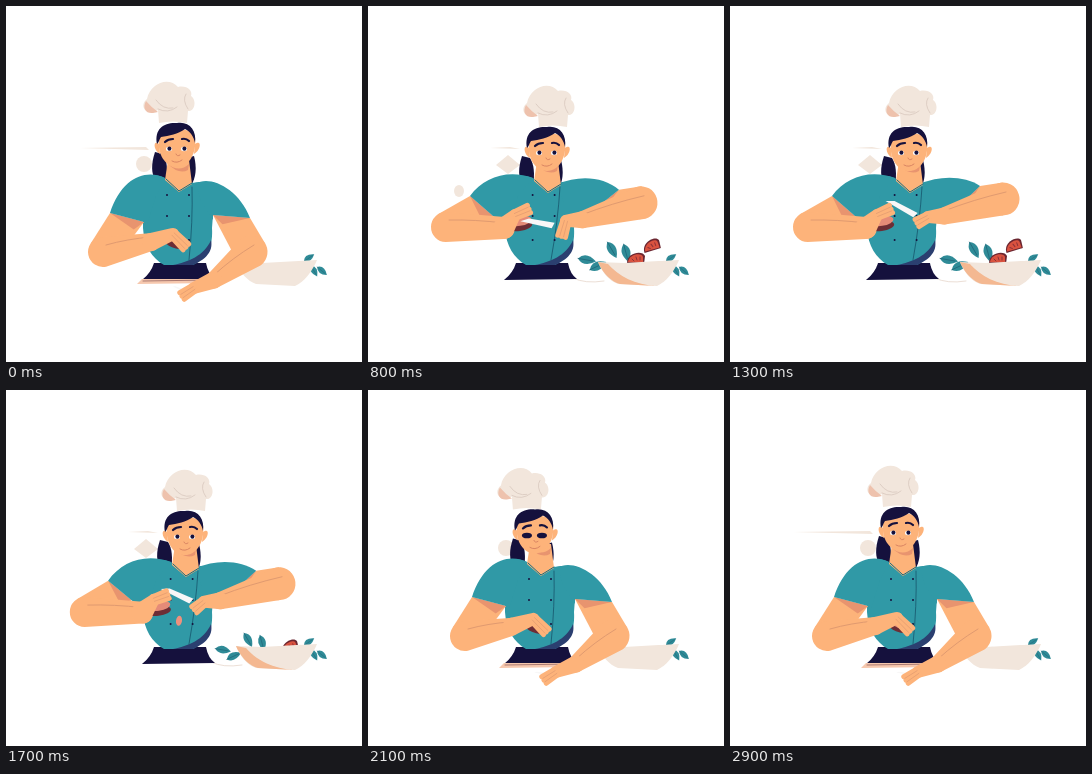
An HTML page that plays this animation: 356 by 356 pixels, repeating every 3000 ms.

```html
<!DOCTYPE html>
<html lang="en">
<head>
<meta charset="utf-8">
<title>Cooking</title>
<style>
html,body{margin:0;width:100%;height:100%;overflow:hidden;background:#fff}
svg{display:block;width:100vw;height:100vh}
</style>
</head>
<body>
<svg id="stage" viewBox="0 0 356 356" fill="none" stroke-linecap="round" stroke-linejoin="round"></svg>
<script>
const LOOP = 3000, STEP = 100;
const TEAL = '#3099a6', SKIN = '#fdb37a', SHADE = '#e8946f', NAVY = '#15113d',
      CREAM = '#f2e6dc', RED = '#d9523f', LEAF = '#2f8b97', CREASE = '#e09a70';
const stage = document.getElementById('stage');

function add(tag, attrs, parent = stage) {
  const e = document.createElementNS('http://www.w3.org/2000/svg', tag);
  for (const k in attrs) e.setAttribute(k, attrs[k]);
  parent.appendChild(e);
  return e;
}
const group = parent => add('g', {}, parent);
const path = (d, fill, parent) => add('path', {d, fill}, parent);
const line = (d, stroke, width, parent) => add('path', {d, stroke, 'stroke-width': width}, parent);
const oval = (cx, cy, rx, ry, fill, parent) => add('ellipse', {cx, cy, rx, ry, fill}, parent);
const shape = (e, d) => e.setAttribute('d', d);
const move = (e, x, y, a = 0, s = 1) => e.setAttribute('transform', `translate(${x} ${y}) rotate(${a}) scale(${s})`);
const show = (e, on) => e.setAttribute('visibility', on ? 'visible' : 'hidden');

const lerp = (a, b, k) => a + (b - a) * k;
const mix = (a, b, k) => [lerp(a[0], b[0], k), lerp(a[1], b[1], k)];
const plus = (a, x, y) => [a[0] + x, a[1] + y];
const clamp = v => Math.min(1, Math.max(0, v));
const ease = (t, from, to) => { const u = clamp((t - from) / (to - from)); return u * u * (3 - 2 * u); };
// goes 0 to 1 between a and b, back to 0 between c and d
const swell = (t, a, b, c, d) => ease(t, a, b) - ease(t, c, d);

function normal(a, b, r) {
  const dx = b[0] - a[0], dy = b[1] - a[1], len = Math.hypot(dx, dy) || 1;
  return [-dy / len * r, dx / len * r];
}
// tapered limb with round ends
function capsule(a, ra, b, rb) {
  const [ax, ay] = normal(a, b, ra), [bx, by] = normal(a, b, rb);
  return `M${plus(a, ax, ay)} L${plus(b, bx, by)} A${rb} ${rb} 0 0 0 ${plus(b, -bx, -by)}` +
    ` L${plus(a, -ax, -ay)} A${ra} ${ra} 0 0 0 ${plus(a, ax, ay)}Z`;
}

// marks behind the cook
const dash = path('', CREAM);
const dot = oval(138, 158, 8, 8, CREAM);
const diamond = path('M140,149 L152,159 L140,168 L128,159Z', CREAM);
const pebble = oval(91, 185, 5, 6, CREAM);

// bowl and what is in it
function leaf(x, y, angle) {
  const g = group();
  path('M-8,0 Q-2,-8 8,0 Q-2,7 -8,0Z', LEAF, g);
  line('M-8,0 L5,0', '#1c5b70', .5, g);
  return {x, y, angle, g};
}
const loose = [leaf(217, 260, 10), leaf(228, 266, -25), leaf(242, 250, 60), leaf(256, 253, 75)];
for (const [x, y, a] of [[303, 252, -35], [308, 265, 60], [316, 265, 40]]) {
  const f = leaf(x, y, a);
  move(f.g, x, y, a, .8);
}
function tomato() {
  const g = group();
  path('M-9,3 C-9,-8 7,-10 9,-4 L8,4Z', '#6b2630', g);
  path('M-8,2 C-7,-6 6,-8 7,-3 L7,3Z', RED, g);
  line('M-4,-1 L-2,1 M0,-3 L1,0 M4,-3 L4,0', '#8c3238', 1, g);
  return g;
}
const half = tomato(), wedge = tomato();
path('M230,256 L256,257 L311,254 C306,266 298,276 289,280 L250,278 C241,275 234,266 230,256Z', CREAM);
const bowlShade = path('M230,256 C235,268 244,276 252,278 L288,280 C268,279 250,270 240,258Z', '#f4b891');
const cloth = line('M205,272 Q217,278 236,275', '#ecdfd6', 1);

const tails = group();
path('M-22,6 C-26,18 -26,28 -21,35 L-11,36 C-9,24 -10,14 -14,8Z', NAVY, tails);
path('M9,12 L17,10 C20,22 19,31 14,40 L9,36Z', NAVY, tails);

const hat = group();
path('M-14,1 L-15,-12 C-28,-5 -34,-17 -26,-23 C-23,-39 -4,-46 5,-35 C14,-37 20,-31 18,-26 C24,-22 22,-10 15,-11 L14,1 Q0,-2 -14,1Z', CREAM, hat);
path('M-27,-21 C-31,-14 -27,-8 -20,-9 L-15,-10 Q-21,-14 -27,-21Z', '#eec2ad', hat);
line('M-15,-13 Q-5,-8 4,-15 M-17,-22 Q-10,-12 0,-14 M13,-28 Q9,-22 15,-13', '#d9c8be', .8, hat);

// each arm: upper part, cuff shadow, sleeve, forearm, hand
function makeArm(back, front, hand) {
  return {
    upper: path('', SKIN, back), shadow: path('', SHADE, back), sleeve: path('', TEAL, back),
    fore: path('', SKIN, front), crease: line('', CREASE, 1, front),
    palm: path('', SKIN, hand),
    fingers: line('', SKIN, 5, hand), gaps: line('', CREASE, .7, hand)
  };
}
function drawArm(arm, j, sleeve, elbowR, wristR) {
  const mid = mix(j.outer, j.inner, .5), [nx, ny] = normal(mid, j.elbow, elbowR);
  const sides = [plus(j.elbow, nx, ny), plus(j.elbow, -nx, -ny)];
  const near = p => Math.hypot(p[0] - j.inner[0], p[1] - j.inner[1]);
  sides.sort((a, b) => near(a) - near(b));
  shape(arm.upper, `M${j.outer} L${j.inner} L${sides[0]} L${sides[1]}Z`);
  shape(arm.shadow, `M${j.outer} L${j.inner} L${mix(j.inner, j.elbow, .25)}Z`);
  shape(arm.sleeve, sleeve);
  shape(arm.fore, capsule(j.elbow, elbowR, j.wrist, wristR));
  shape(arm.crease, `M${plus(j.elbow, 3, -7)} Q${plus(mix(j.elbow, j.wrist, .5), 0, -8)} ${plus(j.wrist, 0, -5)}`);
  shape(arm.palm, capsule(j.wrist, wristR, j.knuckle, 6));
  const [fx, fy] = normal(j.knuckle, j.tip, 4);
  const finger = s => `M${plus(j.knuckle, fx * s * .8, fy * s * .8)} L${plus(j.tip, fx * s, fy * s)}`;
  shape(arm.fingers, finger(-1) + finger(0) + finger(1));
  shape(arm.gaps, finger(-.5) + finger(.5));
}

path('M148,257 L200,257 Q202,268 209,273 L136,274 Q145,267 148,257Z', NAVY);
const torso = path('', TEAL);
const back = group();
path('M205,234 C198,250 182,256 167,259 L187,259 C203,252 207,243 205,234Z', '#2b3f70');
const seam = line('', '#17566d', .8);
const buttons = group();
for (const y of [189, 210, 234]) for (const x of [161, 183]) oval(x, y, 1, 1, NAVY, buttons);

const neck = group();
path('M-10,14 L11,14 L14,38 L1,46 L-13,34Z', SKIN, neck);
path('M-10,18 Q1,27 11,18 L10,24 Q1,29 -10,18Z', SHADE, neck);
line('M-12,33 L1,45 L14,37', '#176c7d', 1, neck);

const head = group();
path('M-18,-2 C-24,-7 -24,4 -17,8Z M18,-2 C25,-7 24,4 17,8Z', SKIN, head);
path('M-18,-8 C-20,8 -12,21 0,21 C12,21 20,7 18,-9 C14,-20 -14,-20 -18,-8Z', SKIN, head);
path('M-20,-2 C-23,-18 -12,-24 0,-23 C12,-25 20,-16 18,-3 C17,-9 13,-15 8,-17 C1,-12 -8,-10 -16,-9 C-18,-6 -18,-4 -20,-2Z', NAVY, head);
line('M-12,-4 Q-9,-7 -4,-7 M5,-7 Q9,-8 12,-5', NAVY, 2.2, head);
line('M-1,8 Q0,11 3,9 M-5,15 Q0,18 5,14', '#d98563', 1, head);
const openEyes = group(head), shutEyes = group(head);
for (const x of [-8, 7]) {
  oval(x, 3, 3, 2.2, '#fff', openEyes);
  oval(x + .4, 2.6, 2, 2.2, NAVY, openEyes);
  oval(x, 3, 5, 2.8, NAVY, shutEyes);
}

const board = group();
path('M136,273 L204,273 L208,277 L131,278Z', '#f6c8ae', board);
line('M137,275 L205,274', '#8c5a58', .7, board);

const leftFront = group(), rightFront = group();
const held = group();
oval(0, 2, 13, 5, '#6d2d35', held);
const flesh = oval(1, -3, 12, 5, '#e58b78', held);
const knife = path('M-1,2 L-33,0 L-25,-4 L1,-4Z', '#f8f7f7');
const left = makeArm(back, leftFront, group());
const right = makeArm(back, rightFront, group());
const slice = oval(0, 0, 3, 5, '#f0907d');

// joints when resting (first) and when cutting (second)
const LEFT = {
  outer: [[104, 207], [102, 190]], inner: [[138, 216], [125, 210]],
  elbow: [[97, 246], [78, 221]], wrist: [[145, 236], [136, 222]],
  knuckle: [[167, 228], [147, 209]], tip: [[180, 241], [161, 203]]
};
const RIGHT = {
  outer: [[244, 212], [251, 184]], inner: [[207, 209], [222, 207]],
  elbow: [[245, 246], [273, 197]], wrist: [[208, 274], [214, 214]],
  knuckle: [[188, 282], [198, 215]], tip: [[176, 290], [194, 231]]
};
const HAND = ['wrist', 'knuckle', 'tip'];
function joints(rig, k, handK) {
  const j = {};
  for (const name in rig) j[name] = mix(...rig[name], HAND.includes(name) ? handK : k);
  return j;
}

function draw(t) {
  const lead = swell(t, 100, 360, 1650, 2050);
  const follow = swell(t, 100, 650, 1700, 2100);
  const reach = Math.min(1, follow * 1.5);
  const lift = reach * ease(t, 600, 800) * (.5 + .5 * Math.cos((t - 1300) / 350 * 2 * Math.PI));
  const sway = Math.sin(Math.PI * clamp((t - 1800) / 1000));

  // head, with the hat swinging twice as far
  const x = lerp(171, 179, reach) - 5 * sway, y = lerp(140, 144, reach) + 3 * sway;
  move(head, x, y);
  move(neck, lerp(172, 179, reach), lerp(140, 141, reach));
  move(tails, x - 3 * reach, y);
  move(hat, 167 + 2 * (x - 171) + 2 * reach, y - 24);
  const blink = t >= 2000 && t < 2300;
  show(openEyes, !blink);
  show(shutEyes, blink);

  // clothes
  const s = 6 * reach;
  shape(torso, `M${159 + s},172 C148,167 140,170 137,178 L137,222 C138,240 146,252 158,259` +
    ` L187,259 C203,251 207,238 206,222 L209,182 C203,174 192,176 ${186 + s},177 L${173 + s},185Z`);
  shape(seam, `M${186 + s},181 Q${187 + s / 2},215 183,254`);
  move(buttons, s * .6, 0);

  // arms
  const l = joints(LEFT, lead, lead), r = joints(RIGHT, follow, reach);
  for (const name of HAND) {
    l[name] = plus(l[name], -2 * sway, sway);
    r[name] = plus(r[name], 0, -4 * lift);
  }
  r.elbow = plus(r.elbow, 0, -4 * lift);
  r.outer = plus(r.outer, -lift, -4 * lift);
  r.tip = plus(r.tip, -7 * lift, -10 * lift);
  drawArm(left, l, `M${159 + s},172 C140,163 116,171 ${l.outer} L${l.inner} L140,222 L150,190Z`, 15, lerp(9, 11, lead));
  drawArm(right, r, `M190,178 C${lerp(202, 210, follow)},169 ${lerp(232, 235, follow)},${lerp(181, 170, follow)} ${r.outer}` +
    ` L${r.inner} L207,214 L195,195Z`, 16.5, 8.5);

  move(held, l.knuckle[0] + 4, l.knuckle[1] + 9, lerp(12, -8, lead), lerp(.8, 1, lead));
  show(flesh, lead > .5 || t >= 2600);
  const heel = mix([176, 284], [185, 221 - 11 * lift], reach);
  move(knife, ...heel, lerp(20, 8, ease(t, 500, 800)) + 19 * lift, lerp(.3, 1, reach));
  show(slice, t >= 1500 && t < 1900);
  move(slice, 173, lerp(214, 250, ((t - 1500) / 400) ** 1.1), 8);
  show(board, lead < .5);

  // bowl
  const low = swell(t, 100, 400, 1700, 2100), high = swell(t, 400, 700, 1400, 1700);
  for (const f of loose) move(f.g, lerp(258, f.x, low) + 2 * high, lerp(268, f.y, low) - 6 * high, f.angle, low * (1 + .15 * high));
  move(half, 268, lerp(267, 254, high));
  move(wedge, 284, lerp(258, 241, high), -20);
  show(half, high > 0);
  show(wedge, low > .9 && t > 400);
  bowlShade.setAttribute('opacity', low);
  show(cloth, low > .8);

  // marks
  const cutting = t >= 600 && t < 1900, resting = t < 300 || t >= 2600;
  shape(dash, cutting ? 'M122,142 L142,141 L152,143Z' : `M${t < 300 ? 74 : 63},142 L140,141 L143,144Z`);
  show(dash, cutting || resting);
  show(diamond, cutting);
  show(dot, !cutting);
  dot.setAttribute('ry', lerp(8, 5, lead));
  show(pebble, t >= 300 && t < 1100);
}

function tick(now) {
  draw(Math.floor((now % LOOP) / STEP) * STEP);
  requestAnimationFrame(tick);
}
draw(0);
requestAnimationFrame(tick);
</script>
</body>
</html>
```
